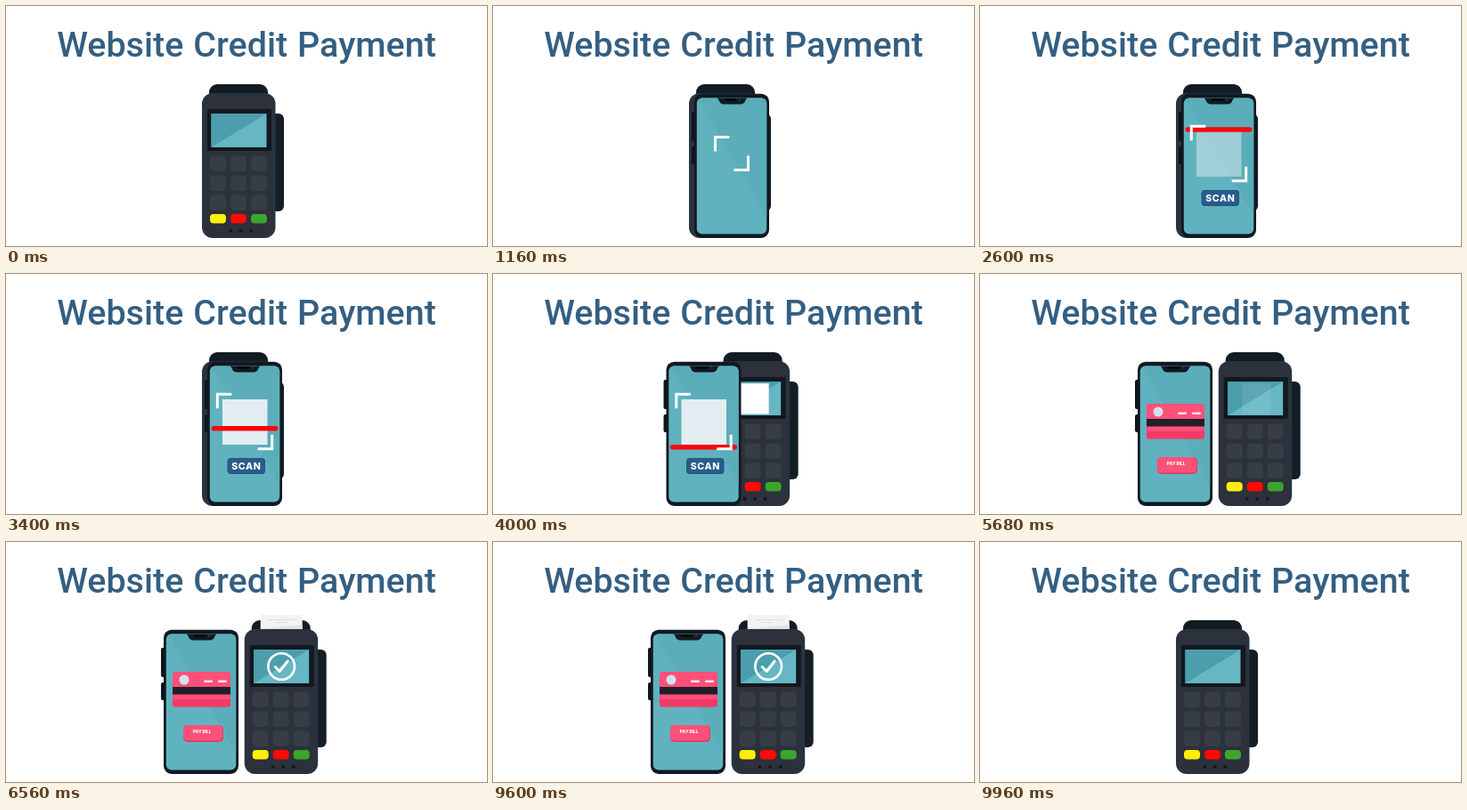
These frames come from a looping animation (540 px wide and 270 px high, 10 s). An HTML page with a canvas:

```html
<!DOCTYPE html>
<html lang="en">
<head>
<meta charset="utf-8">
<title>Website Credit Payment</title>
<style>
  html, body { margin: 0; width: 100%; height: 100%; overflow: hidden; background: #fff; }
  canvas, svg { position: absolute; left: 0; top: 0; width: 540px; height: 270px; }
  text { font: 500 39.4px Roboto, "Open Sans", sans-serif; word-spacing: 1.2px; fill: #345f82; text-anchor: middle; }
</style>
</head>
<body>
<svg viewBox="0 0 540 270"><text x="270" y="57">Website Credit Payment</text></svg>
<canvas id="terminal"></canvas>
<canvas id="phone"></canvas>
<script>
const W = 540, H = 270, LOOP = 10000;
const TEAL = '#60b2bf', DARK = '#111922', PINK = '#ff5079';

function layer(id) {
  const el = document.getElementById(id);
  const dpr = window.devicePixelRatio || 1;
  el.width = W * dpr;
  el.height = H * dpr;
  const c = el.getContext('2d');
  c.scale(dpr, dpr);
  return c;
}
const termCtx = layer('terminal'), phoneCtx = layer('phone');

const clamp = v => Math.max(0, Math.min(1, v));
const span = (t, from, to) => clamp((t - from) / (to - from));
const mix = (a, b, p) => a + (b - a) * p;
const easeOut = (p, n = 3) => 1 - Math.pow(1 - p, n);
const easeInOut = p => p * p * (3 - 2 * p);

function box(c, x, y, w, h, r, fill) {
  c.fillStyle = fill;
  c.beginPath();
  c.roundRect(x, y, w, h, r);
  c.fill();
}

function shape(c, points, fill) {
  c.fillStyle = fill;
  c.beginPath();
  points.forEach(([x, y]) => c.lineTo(x, y));
  c.closePath();
  c.fill();
}

function line(c, points, color, width) {
  c.strokeStyle = color;
  c.lineWidth = width;
  c.beginPath();
  points.forEach(([x, y]) => c.lineTo(x, y));
  c.stroke();
}

function disc(c, x, y, r, fill) {
  c.fillStyle = fill;
  c.beginPath();
  c.arc(x, y, r, 0, Math.PI * 2);
  c.fill();
}

function label(c, text, x, y, size, spacing = 0) {
  c.font = `800 ${size}px Inter, sans-serif`;
  c.letterSpacing = `${spacing}px`;
  c.textAlign = 'center';
  c.textBaseline = 'alphabetic';
  c.fillStyle = '#fff';
  c.fillText(text, x, y);
}

// Draws with its own opacity, optionally scaled around a point.
function part(c, alpha, draw, scale = 1, cx = 0, cy = 0) {
  if (alpha <= 0 || scale <= 0) return;
  c.save();
  c.globalAlpha *= alpha;
  c.translate(cx, cy);
  c.scale(scale, scale);
  c.translate(-cx, -cy);
  draw();
  c.restore();
}

function drawReceipt(c, rise) {
  if (rise <= 0) return;
  const y = mix(99, 82, rise);
  box(c, 18, y, 47, 18, 1, '#f2f3f4');
  box(c, 27, y + 5, 31, 1, 0, '#d9dcdf');
  box(c, 34, y + 8, 13, 1, 0, '#d9dcdf');
  shape(c, [[18, 98], [65, 98], [65, 93]], '#dfe2e4');
}

function drawCheck(c, p) {
  if (p <= 0) return;
  c.save();
  c.lineCap = c.lineJoin = 'round';
  c.strokeStyle = '#fff';
  c.lineWidth = 2.6;
  c.beginPath();
  c.arc(41.5, 140, 14.8, -Math.PI / 2, -Math.PI / 2 + Math.PI * 2 * clamp(p / 0.6));
  c.stroke();
  const tick = clamp((p - 0.5) / 0.5);
  if (tick > 0) {
    c.setLineDash([24 * tick, 40]);
    line(c, [[34.5, 140.5], [39.5, 145.5], [48.5, 134]], '#fff', 3);
  }
  c.restore();
}

function drawTerminal(c, x, s) {
  c.save();
  c.translate(x, 0);
  box(c, 8, 88, 66, 24, 9, '#141c23');
  drawReceipt(c, s.receipt);
  box(c, 70, 121, 22, 110, 6, '#151d25');
  box(c, 0, 98, 82.5, 163, 12, '#263645');
  box(c, 1.5, 99, 79.5, 161, 11, '#2c313c');

  box(c, 6, 116, 72, 47, 1, '#11181f');
  box(c, 10.5, 121, 62, 38, 0, '#66b6c4');
  shape(c, [[10.5, 121], [72.5, 121], [10.5, 159]], '#4c9eac');
  part(c, s.plate, () => box(c, 26.5, 123, 32.5, 34.5, 0, '#fff'));
  part(c, s.checkAlpha, () => drawCheck(c, s.check));

  const keys = ['#ffee0c', '#fd0a06', '#3ba42c'];
  for (let col = 0; col < 3; col++) {
    const kx = 9 + col * 23;
    for (let row = 0; row < 3; row++) box(c, kx, 168.5 + row * 22, 18, 17.5, 4, '#363d46');
    box(c, kx, 234, 18, 10.5, 4, keys[col]);
    disc(c, 32 + col * 11.5, 253, 2, '#13181e');
  }
  c.restore();
}

function drawCorners(c, half) {
  const cx = 42, cy = 166, arm = 16;
  for (const d of [-1, 1]) {
    const x = cx + d * (half - 1.5), y = cy + d * (half - 1.5);
    line(c, [[x, y - d * arm], [x, y], [x - d * arm, y]], '#fff', 3);
  }
}

function drawScan(c, s) {
  part(c, s.code, () => box(c, 17, 141, 50.5, 51, 0, '#e2edf1'));
  part(c, s.button, () => {
    const y = 207 + s.buttonDrop;
    box(c, 22.5, y, 42.5, 18, 4, '#1f4f7b');
    box(c, 23, y + 0.5, 41.5, 16.5, 3.5, '#275c8b');
    label(c, 'SCAN', 43.8, y + 12.5, 10.6, 0.6);
  });
  part(c, s.bar, () => box(c, 4.5, s.barY - 2.8, 75, 5.6, 2.8, '#f7080b'));
  drawCorners(c, s.corners);
}

function drawCard(c) {
  box(c, 10, 146, 65, 39.5, 3, PINK);
  box(c, 10, 177, 65, 8.5, [0, 0, 3, 3], '#f23a69');
  box(c, 10, 163, 65, 8.5, 0, '#231f2a');
  disc(c, 23, 155, 5.5, '#cfe3ee');
  box(c, 45, 155.5, 10, 2.5, 1, '#fbe3ea');
  box(c, 61, 155.5, 10, 2.5, 1, '#fbe3ea');
}

function drawPay(c) {
  box(c, 22, 206, 45, 19, 5, '#dc3c63');
  box(c, 22, 206, 44, 17.5, 5, PINK);
  label(c, 'PAY BILL', 43.2, 215.2, 4.8);
}

function drawPhone(c, x, s) {
  c.save();
  c.translate(x, 0);
  box(c, -3, 119, 6, 33, 2, '#0d141b');
  box(c, -3, 158, 6, 20, 2, '#0d141b');
  box(c, 0, 98.7, 84, 162.3, 9, DARK);
  c.save();
  c.beginPath();
  c.roundRect(2.8, 103.4, 78.4, 153.1, 6);
  c.clip();
  box(c, 2, 102, 81, 156, 0, TEAL);
  shape(c, [[4, 103], [83, 103], [83, 240]], '#5badba');
  shape(c, [[24, 102], [61, 102], [58, 105], [56, 109], [53, 110.5],
            [32, 110.5], [29, 109], [27, 105]], DARK);
  c.restore();
  box(c, 34, 104.3, 13, 2.5, 1, '#04080c');
  disc(c, 51, 105.4, 1.3, '#253543');

  part(c, s.scan, () => drawScan(c, s));
  part(c, s.card, () => drawCard(c), mix(0.85, 1, s.card), 42.5, 166);
  part(c, clamp(s.pay * 2), () => drawPay(c), s.pay * s.press, 44.5, 215.5);
  c.restore();
}

function render(t) {
  const enter = easeOut(span(t, 640, 1140));
  const split = easeOut(span(t, 3760, 4590));
  const leave = easeInOut(span(t, 9600, 9960));

  termCtx.clearRect(0, 0, W, H);
  drawTerminal(termCtx, 220 + 47.7 * split * (1 - leave), {
    plate: span(t, 3000, 3400) * (1 - span(t, 5500, 5700)),
    check: easeInOut(span(t, 5700, 6300)),
    checkAlpha: 1 - leave,
    receipt: easeOut(span(t, 5840, 6560), 2) * (1 - leave)
  });

  phoneCtx.clearRect(0, 0, W, H);
  phoneCtx.canvas.style.opacity = clamp(enter * 1.3) * (1 - leave);
  if (t < 640 || leave === 1) return;
  const rise = easeOut(span(t, 1400, 1900));
  drawPhone(phoneCtx, 226 + 71 * (1 - enter) - 49 * split - 15 * leave, {
    scan: 1 - span(t, 4200, 4480),
    corners: mix(20, 32.2, easeInOut(span(t, 1240, 1900))),
    button: rise,
    buttonDrop: 26 * (1 - rise),
    code: span(t, 2300, 2900),
    bar: span(t, 2440, 2560),
    barY: mix(138.8, 194.8, easeInOut(span(t, 2560, 4000))),
    card: easeOut(span(t, 4380, 4720)),
    pay: easeOut(span(t, 4600, 4935), 2),
    press: 1 - 0.1 * Math.sin(Math.PI * span(t, 5200, 5500))
  });
}

const start = performance.now();
function frame() {
  render((performance.now() - start) % LOOP);
  requestAnimationFrame(frame);
}
frame();
</script>
</body>
</html>
```
